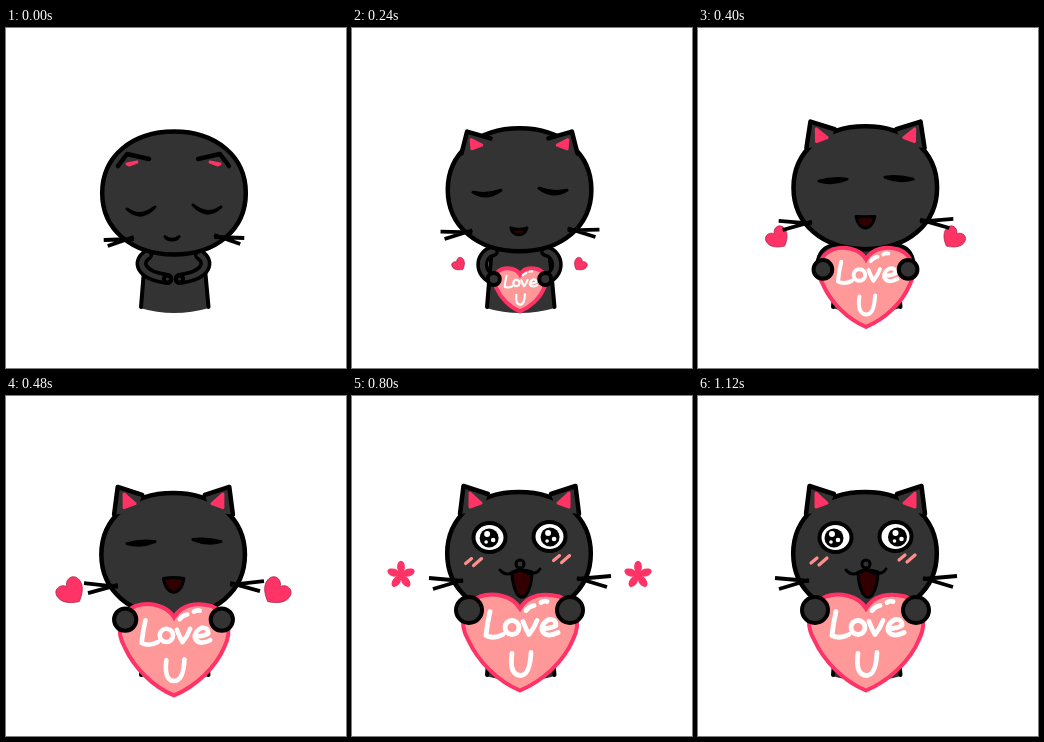
Animation, 340 px wide and 340 px high, one loop 1.24 s. Source, as an HTML page:

```html
<!DOCTYPE html>
<html lang="en">
<head>
<meta charset="utf-8">
<title>Cat with a heart</title>
<style>
  html, body { margin: 0; width: 100%; height: 100%; overflow: hidden; background: #fff; }
  svg { display: block; width: 100vw; height: 100vh; }
  .line { fill: none; stroke: #000; stroke-width: 4; stroke-linecap: round; stroke-linejoin: round; }
  .fur { fill: #333; }
  .pink { fill: #ff3366; }
  .outlined { fill: #333; stroke-width: 4.5; }
  .eye { fill: #fff; }
  .thin { stroke-width: 3; }
  .arm { fill: none; stroke: #000; stroke-width: 12; stroke-linecap: round; }
  .sleeve { stroke: #333; stroke-width: 5; }
  .lid { stroke: #000; stroke-width: 3; stroke-linejoin: round; }
  .inner { stroke: #ff3366; stroke-width: 3; stroke-linejoin: round; }
  .mouth { fill: #330000; stroke: #000; stroke-width: 3; stroke-linejoin: round; }
  .blush { fill: none; stroke: #ff8f8a; stroke-width: 3.2; stroke-linecap: round; }
  .whisker { fill: none; stroke: #000; stroke-width: 3.8; }
  .card { fill: #ff9999; stroke: #ff3366; stroke-width: 4; vector-effect: non-scaling-stroke; }
  .letters { fill: none; stroke: #fff; stroke-width: 4.8; stroke-linecap: round; stroke-linejoin: round; }
  .edge { stroke: #a8274a; stroke-width: .8; vector-effect: non-scaling-stroke; }
</style>
</head>
<body>
<svg viewBox="0 0 340 340" role="img" aria-label="Love U">
  <defs>
    <g id="pupil">
      <circle r="9.5"/>
      <g fill="#fff">
        <circle cx="-2" cy="-4" r="3"/>
        <circle cx="4" cy="2" r="2.3"/>
        <circle cx="-3" cy="4" r="1.8"/>
      </g>
    </g>
    <path id="flush" class="blush" d="M-8 2l6-5M0 4l8-7"/>
  </defs>

  <g id="fliers"></g>
  <path class="fur" d="M141 206L134 280Q168 290 203 280L196 206Z"/>
  <path class="line" d="M139 230L135 279M198 230L202.5 279"/>
  <g id="arms"></g>
  <path id="head" class="line outlined"/>
  <g id="ears"></g>
  <g id="whiskers"></g>

  <g id="sleepy">
    <g id="lids"></g>
    <path id="lips" class="mouth"/>
  </g>

  <g id="awake">
    <ellipse class="line eye" cx="137.5" cy="141.5" rx="16" ry="14.5"/>
    <ellipse class="line eye" cx="197.5" cy="140.5" rx="16" ry="14.5"/>
    <use id="pupilL" href="#pupil" y="142"/>
    <use id="pupilR" href="#pupil" y="141"/>
    <g id="cheeks">
      <use href="#flush" x="122" y="166"/>
      <use href="#flush" x="210" y="163"/>
    </g>
    <path class="mouth" d="M160 176Q169 172 180 176Q180 190 174 199Q170 204 165 198Q160 188 160 176Z"/>
    <path class="line thin" d="M148 174Q153 180 160 177Q167 175 168 172Q170 175 176 177Q184 179 188 173"/>
    <circle class="line thin fur" style="fill:#333" cx="168" cy="168" r="4"/>
  </g>

  <g id="heart">
    <path class="card" d="M0-84C-8-98-28-100-40-96C-60-88-60-67-52-53C-42-31-22-11 0-2C22-11 44-31 53-53C61-69 58-89 39-96C24-100 8-98 0-84Z"/>
    <g class="letters">
      <path d="M6-82Q9-86 14-87M21-90Q24-92 27-91"/>
      <g id="words">
        <path d="M-30-81Q-33-68-34-57Q-26-53-17-58"/>
        <ellipse cx="-8" cy="-65" rx="7" ry="7"/>
        <path d="M3-71Q6-63 9-58Q14-64 17-72"/>
        <path d="M23-64Q31-64 36-67Q36-74 29-73Q21-69 22-62Q26-54 38-60"/>
        <path d="M-8-39Q-11-17 1-17Q10-18 11-40"/>
      </g>
    </g>
  </g>
  <g id="hands"></g>
</svg>

<script>
const STEP = 80, LAST = 14, LOOP = 1240;
const WAKE = 7;    // eyes open, the heart is fully raised
const BURST = 8;   // flying hearts turn into petals afterwards
const GONE = 13;
const FLIP = 'matrix(-1 0 0 1 335 0)';

const $ = id => document.getElementById(id);
const clamp = v => Math.max(0, Math.min(1, v));
const smooth = v => (v = clamp(v), v * v * (3 - 2 * v));
const mix = (a, b, p) => a + (b - a) * p;

function add(parent, tag, attrs) {
  const node = document.createElementNS('http://www.w3.org/2000/svg', tag);
  set(node, attrs);
  return parent.appendChild(node);
}
function set(node, attrs) {
  for (const key in attrs) node.setAttribute(key, attrs[key]);
}
function show(node, on) {
  node.style.display = on ? '' : 'none';
}

// Everything in a layer is drawn for the left side and mirrored to the right.
function pair(layer, tag, attrs, flip = FLIP) {
  return ['', flip].map(transform => add(add($(layer), 'g', { transform }), tag, attrs));
}
function setPair(nodes, attrs) {
  nodes.forEach(node => set(node, attrs));
}

const miniHeart = pair('fliers', 'path', { class: 'pink edge', d: 'M0-5C-2-10-10-10-10-3C-10 3-4 7 0 9C4 7 10 3 10-3C10-10 2-10 0-5Z' });
const flowers = pair('fliers', 'g', { class: 'pink', transform: 'translate(49 179)' });
const cores = flowers.map(node => add(node, 'circle', {}));
const petals = flowers.flatMap(node => [0, 1, 2, 3, 4].map(i =>
  add(node, 'ellipse', { transform: `rotate(${i * 72 - 90})` })));
const arms = [...pair('arms', 'path', { class: 'arm' }), ...pair('arms', 'path', { class: 'arm sleeve' })];
const earFills = pair('ears', 'path', { class: 'fur' });
const earLines = pair('ears', 'path', { class: 'line outlined', style: 'fill:none' });
const earInners = pair('ears', 'path', { class: 'pink inner' });
const whiskers = pair('whiskers', 'path', { class: 'whisker' }, 'matrix(-1 0 0 1 336 -2)');
const lids = pair('lids', 'path', { class: 'lid' }, 'matrix(-1 0 0 1 336 -2)');
const hands = pair('hands', 'circle', { class: 'line', style: 'fill:#333' });

function drawHead(step, t, rise) {
  const x = mix(168, 167, t), y = mix(165, 157.5, t), w = 71.8, h = 61.5, k = .59;
  set($('head'), { d: `M${x - w} ${y}C${x - w} ${y - h * k} ${x - w * k} ${y - h} ${x} ${y - h}
    S${x + w} ${y - h * k} ${x + w} ${y}S${x + w * k} ${y + h} ${x} ${y + h}S${x - w} ${y + h * k} ${x - w} ${y}Z` });

  const ear = `M${mix(112, 108, rise)} ${mix(138, 118, rise)}
    L${mix(121, 111.5, rise)} ${mix(126, 90, rise)}L${mix(143, 136, rise)} ${mix(131, 98, rise)}`;
  setPair(earLines, { d: ear });
  // The fill reaches into the head to hide its outline under the ear.
  setPair(earFills, { d: `${ear}L${mix(134, 130, rise)} ${mix(142, 116, rise)}Z` });
  setPair(earInners, { d: `M${mix(121, 118, rise)} ${mix(136, 97, rise)}
    L${mix(131, 129, rise)} ${mix(134, 107, rise)}L${mix(123, 118, rise)} ${mix(137, 111, rise)}Z` });
}

function drawFace(step, t, push, grow) {
  const awake = step >= WAKE;
  show($('sleepy'), !awake);
  show($('awake'), awake);

  // Lids sag in sleep and straighten just before waking.
  const sag = 1 - smooth((step - 2) / 2), ly = mix(180, 141, t);
  setPair(lids, { d: `M121 ${ly + 1}Q135 ${ly + mix(-3, 11, sag)} 149 ${ly - 1}Q135 ${ly + mix(5, 14, sag)} 121 ${ly + 1}Z` });

  const x = mix(166, 168, t), y = mix(208.5, 176, push), w = mix(7, 11, push);
  const top = mix(3.5, -2, push), drop = mix(4.5, 22, push);
  set($('lips'), { d: `M${x - w} ${y}C${x - w / 2} ${y + top} ${x + w / 2} ${y + top} ${x + w} ${y}
    C${x + w * .7} ${y + drop} ${x - w * .7} ${y + drop} ${x - w} ${y}Z` });

  const wx = mix(98, 77, grow), ix = mix(128, 111, grow), iy = mix(210, 185, push);
  const sway = clamp((step - WAKE) / 3);
  setPair(whiskers, { d: `M${wx} ${mix(212, 181, push) + sway}L${ix} ${iy + 1 - sway}
    M${wx + 4} ${mix(218, 192, push) + sway}L${ix} ${iy - 1}` });

  const drift = clamp((step - WAKE) / (LAST - WAKE));
  set($('pupilL'), { x: mix(138, 136, drift) });
  set($('pupilR'), { x: mix(197, 199.5, drift) });
  set($('cheeks'), { transform: `translate(${-drift} ${-drift})` });
}

function drawArms(t, push, grow, lift) {
  const hx = mix(162, 117, grow), hy = mix(251, 214, lift), elbow = mix(132, 120, grow);
  for (const node of arms)
    set(node, { d: `M141 ${mix(227, 218, t)}C${elbow} ${mix(233, 219, grow)} ${elbow} ${hy - 4} ${hx} ${hy}` });
  setPair(hands, { cx: hx, cy: hy, r: mix(3.5, 13, push) });
}

function drawHeart(step, grow) {
  const p = (step - 1) / (WAKE - 1);
  const middle = step < WAKE ? mix(254, 247, p) + 12 * Math.sin(Math.PI * p) : 247;
  show($('heart'), step >= 1);
  show($('words'), step >= 3);
  set($('heart'), { transform: `translate(168 ${middle + 49.5 * grow}) scale(${grow})` });
}

function drawFliers(step, push) {
  const size = mix(.3, 1.65, push) * (step < BURST ? 1 : .75);
  for (const node of miniHeart) show(node, step >= 2 && step <= BURST);
  setPair(miniHeart, { transform: `translate(${mix(128, 50, push)} ${mix(257, 181, push)}) rotate(-40) scale(${size})` });

  const age = step - BURST, length = 8 - .9 * age;
  for (const node of flowers) show(node, age > 0 && step < GONE);
  if (age <= 0 || step >= GONE) return;
  for (const node of cores) set(node, { r: 8 - 1.7 * age });
  for (const node of petals) set(node, { cx: 4 + 2 * age, rx: length, ry: length * .62 });
}

function draw(step) {
  const t = clamp(step / WAKE);
  const rise = Math.sin(t * Math.PI / 2);
  const push = clamp((step - 1) / (WAKE - 1)) ** 1.2;
  const grow = smooth((step + .5) / (WAKE + .5));
  const lift = smooth((step - 4) / 3);
  drawHead(step, t, rise);
  drawFace(step, t, push, grow);
  drawArms(t, push, grow, lift);
  drawHeart(step, grow);
  drawFliers(step, push);
}

let shown = -1;
function tick() {
  const step = Math.min(LAST, Math.floor(performance.now() % LOOP / STEP));
  if (step !== shown) draw(shown = step);
  requestAnimationFrame(tick);
}
tick();
</script>
</body>
</html>
```
